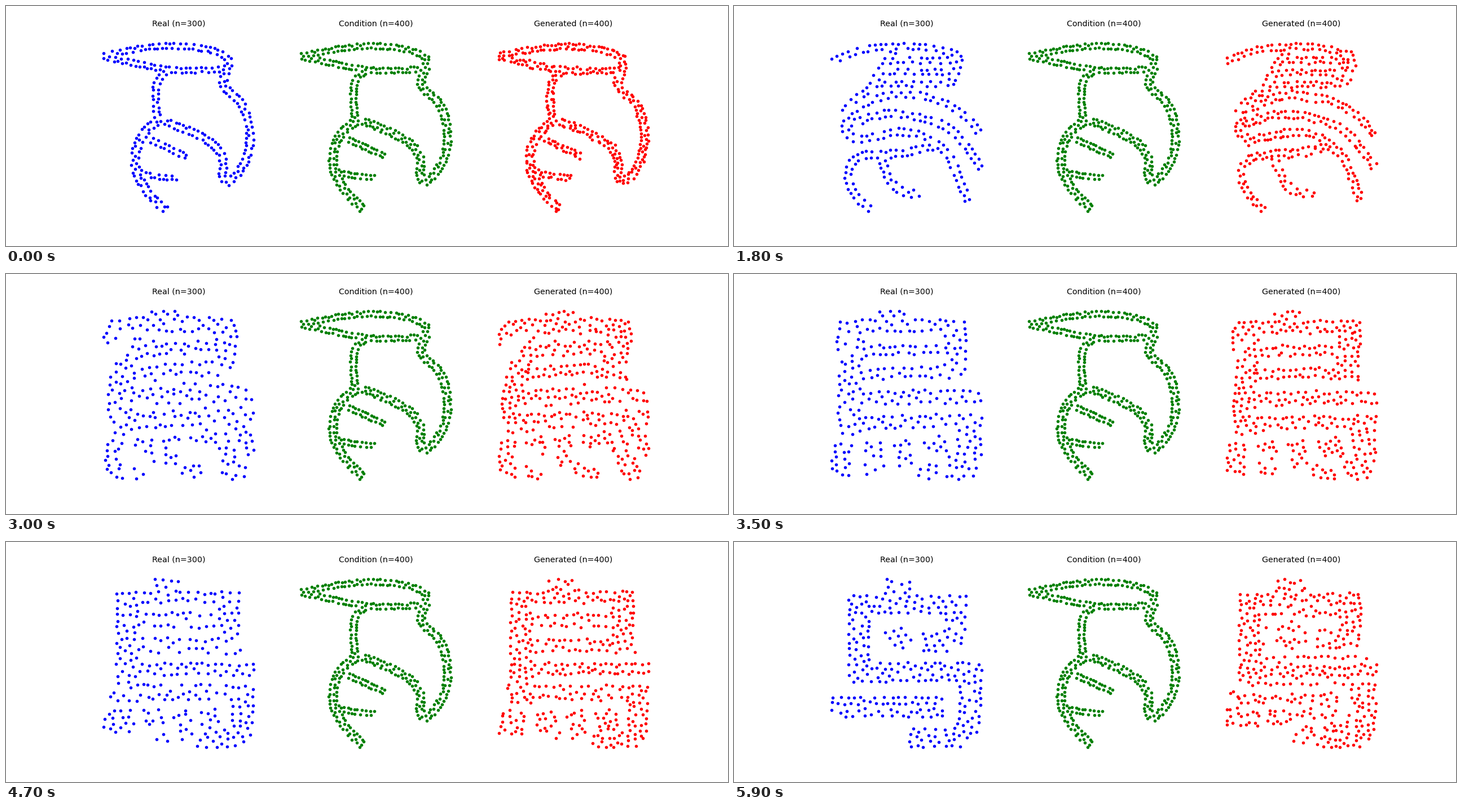
These frames come from a looping animation (1280x427 px, 6 s). A matplotlib script:

```python
import numpy as np
import matplotlib.pyplot as plt
from matplotlib.animation import FuncAnimation

W, H, DPI = 1280, 427, 100
STEPS, FRAMES = 20, 60
SCALE = 1280 / 1500

# Each stroke: half width, then x, y pairs of its centre line.
BRUSH = [
    (5, 176, 88, 205, 82, 245, 75, 295, 71, 340, 74, 375, 82, 391, 93),
    (5, 176, 90, 203, 96, 240, 104, 285, 113, 330, 115, 378, 113),
    (6.5, 392, 90, 393, 108, 387, 124, 385, 141, 397, 155, 413, 170, 426, 196,
     431, 225, 429, 255, 419, 284, 406, 304, 391, 315),
    (6.5, 284, 206, 309, 216, 340, 230, 366, 246, 380, 264, 384, 282, 383, 300, 388, 314),
    (5.5, 284, 118, 270, 133, 266, 160, 268, 190, 270, 206),
    (7, 270, 206, 252, 220, 238, 240, 230, 272, 235, 300, 248, 325, 265, 346, 283, 363),
    (5, 257, 238, 290, 254, 319, 268),
    (4.5, 240, 296, 265, 303, 303, 307),
]
CURSIVE = [
    (5.5, 177, 99, 205, 86, 240, 76, 275, 73, 315, 72, 355, 76, 390, 84),
    (10, 390, 84, 398, 100, 380, 134),
    (7.5, 286, 84, 262, 118, 245, 150, 213, 176, 198, 202, 200, 224, 216, 238),
    (5, 280, 97, 395, 97),
    (5, 270, 118, 382, 118),
    (4.5, 258, 141, 378, 140),
    (6, 215, 184, 262, 164, 305, 160, 350, 166, 385, 181, 415, 203, 437, 229),
    (6.5, 204, 211, 255, 196, 300, 193, 340, 201, 373, 215, 403, 241, 425, 271, 438, 289),
    (6.5, 212, 240, 250, 234, 290, 226, 325, 230, 358, 245, 382, 271, 399, 308, 413, 351),
    (6.5, 357, 250, 300, 263, 250, 265, 220, 271, 202, 294, 205, 322, 221, 347, 241, 364),
    (6.5, 263, 264, 268, 290, 280, 315, 300, 333, 327, 337),
]
BLOCK = [
    (5.5, 262, 73, 304, 74),
    (8, 284, 74, 291, 98),
    (9.5, 194, 96, 413, 96),
    (7.5, 215, 139.5, 366, 139.5),
    (8, 215, 180, 385, 180),
    (9.5, 205, 223.5, 438, 223.5),
    (9, 215, 267, 437, 267),
    (17.5, 211, 88, 211, 285),
    (18, 395, 88, 395, 190),
    (18, 418, 258, 418, 330, 406, 354),
    (13, 341, 352, 408, 352),
    (16.5, 201, 304, 190, 353),
    (15, 252, 304, 257, 348),
    (14, 303, 302, 314, 340),
    (14, 358, 300, 373, 340),
]
PRINT = [
    (22, 289, 67, 289, 98),
    (15.5, 203, 111, 411, 111),
    (18, 221, 96, 221, 248),
    (19, 392, 96, 391, 150, 382, 180),
    (16, 335, 179, 378, 179),
    (14, 278, 153.5, 303, 185),
    (17.5, 203, 232, 438, 232),
    (19, 418, 225, 417, 315, 404, 346),
    (17, 311, 348, 404, 348),
    (17.5, 173, 293.5, 369, 293.5),
]
GLYPHS = [BRUSH, CURSIVE, BLOCK, PRINT]


def centre_line(flat):
    """Catmull-Rom curve through the points, evenly spaced."""
    p = np.array(flat, float).reshape(-1, 2)
    q = np.vstack([2 * p[0] - p[1], p, 2 * p[-1] - p[-2]])
    s = np.linspace(0, len(p) - 1, 200)
    i = np.minimum(s.astype(int), len(p) - 2)
    u = (s - i)[:, None]
    a, b, c, d = q[i], q[i + 1], q[i + 2], q[i + 3]
    curve = b + 0.5 * u * (c - a + u * (2 * a - 5 * b + 4 * c - d
                                        + u * (3 * (b - c) + d - a)))
    run = np.r_[0, np.cumsum(np.hypot(*np.diff(curve, axis=0).T))]
    even = np.linspace(0, run[-1], 300)
    line = np.column_stack([np.interp(even, run, curve[:, k]) for k in (0, 1)])
    return line, run[-1]


def candidates(glyph, count, rng):
    lines = [centre_line(s[1:]) for s in glyph]
    areas = np.array([length * s[0] for (_, length), s in zip(lines, glyph)])
    shares = np.ceil(count * areas / areas.sum()).astype(int)
    parts = []
    for (line, _), stroke, m in zip(lines, glyph, shares):
        tangent = np.gradient(line, axis=0)
        tangent /= np.linalg.norm(tangent, axis=1)[:, None]
        normal = tangent[:, ::-1] * (-1, 1)
        k = np.linspace(0, len(line) - 1, m).round().astype(int)
        side = rng.uniform(-1, 1, m)
        side = np.sign(side) * np.abs(side) ** 0.5 * stroke[0]
        parts.append(line[k] + normal[k] * side[:, None])
    return np.vstack(parts)


def scatter_glyph(glyph, n, seed):
    """Thin random candidates down to n evenly spread dots."""
    rng = np.random.default_rng(seed)
    p = candidates(glyph, 5 * n, rng)
    reach = 23 * np.sqrt(300 / n)
    dist = np.hypot(p[:, None, 0] - p[None, :, 0], p[:, None, 1] - p[None, :, 1])
    weight = np.clip(1 - dist / reach, 0, None) ** 8
    np.fill_diagonal(weight, 0)
    crowd = weight.sum(1)
    for _ in range(len(p) - n):
        worst = crowd.argmax()
        crowd -= weight[worst]
        crowd[worst] = -np.inf
    return p[np.isfinite(crowd)]


def match(a, b, seed, rounds=6000):
    """Reorder b so the total squared travel from a is small."""
    rng = np.random.default_rng(seed)
    a = a[np.argsort(a[:, 1])]
    b = b[np.argsort(b[:, 1])]
    half = len(a) // 2
    for _ in range(rounds):
        order = rng.permutation(len(a))
        i, j = order[:half], order[half:]
        gain = ((a[i] - a[j]) * (b[i] - b[j])).sum(1) < 0
        i, j = i[gain], j[gain]
        b[i], b[j] = b[j], b[i]
    return a, b


def normalise(p):
    lo, hi = p.min(0), p.max(0)
    return (2 * (p - lo) / (hi - lo) - 1) * (1, -1)


def morphs(n, seed):
    sets = [scatter_glyph(g, n, seed + k) for k, g in enumerate(GLYPHS)]
    return [match(a, b, seed) for a, b in zip(sets, sets[1:])]


def blend(pair, t):
    return pair[0] + (pair[1] - pair[0]) * t


real = morphs(300, 10)
generated = morphs(400, 20)
condition = normalise(scatter_glyph(BRUSH, 400, 30))
wobble = np.random.default_rng(5).normal(0, 1.0, (400, 2))
REACHED = (1, 1, 0.6)  # share of each morph the generated dots complete

# The small excess keeps the pixel size from being truncated.
fig, axes = plt.subplots(1, 3, figsize=((W + 0.01) / DPI, (H + 0.01) / DPI), dpi=DPI)
fig.subplots_adjust(left=0.125, right=0.9, bottom=0.11, top=0.88, wspace=0.2)


def panel(ax, title, color):
    ax.set(xlim=(-1.1, 1.1), ylim=(-1.1, 1.1))
    ax.axis("off")
    box = ax.get_position()
    fig.text((box.x0 + box.x1) / 2, 1 - 35 / H, title, ha="center", va="baseline",
             fontsize=12 * SCALE, family="DejaVu Sans")
    return ax.scatter([], [], s=10 * SCALE ** 2, c=color, linewidths=1.5 * SCALE)


real_dots = panel(axes[0], "Real (n=300)", "blue")
condition_dots = panel(axes[1], "Condition (n=400)", "green")
generated_dots = panel(axes[2], "Generated (n=400)", "red")
condition_dots.set_offsets(condition)


def draw(frame):
    part, step = divmod(frame, STEPS)
    t = step / (STEPS - 1)
    real_dots.set_offsets(normalise(blend(real[part], t)))
    generated_dots.set_offsets(
        normalise(blend(generated[part], t * REACHED[part]) + wobble))
    return real_dots, generated_dots


anim = FuncAnimation(fig, draw, frames=FRAMES, interval=100, repeat=True, repeat_delay=0)
plt.show()
```
